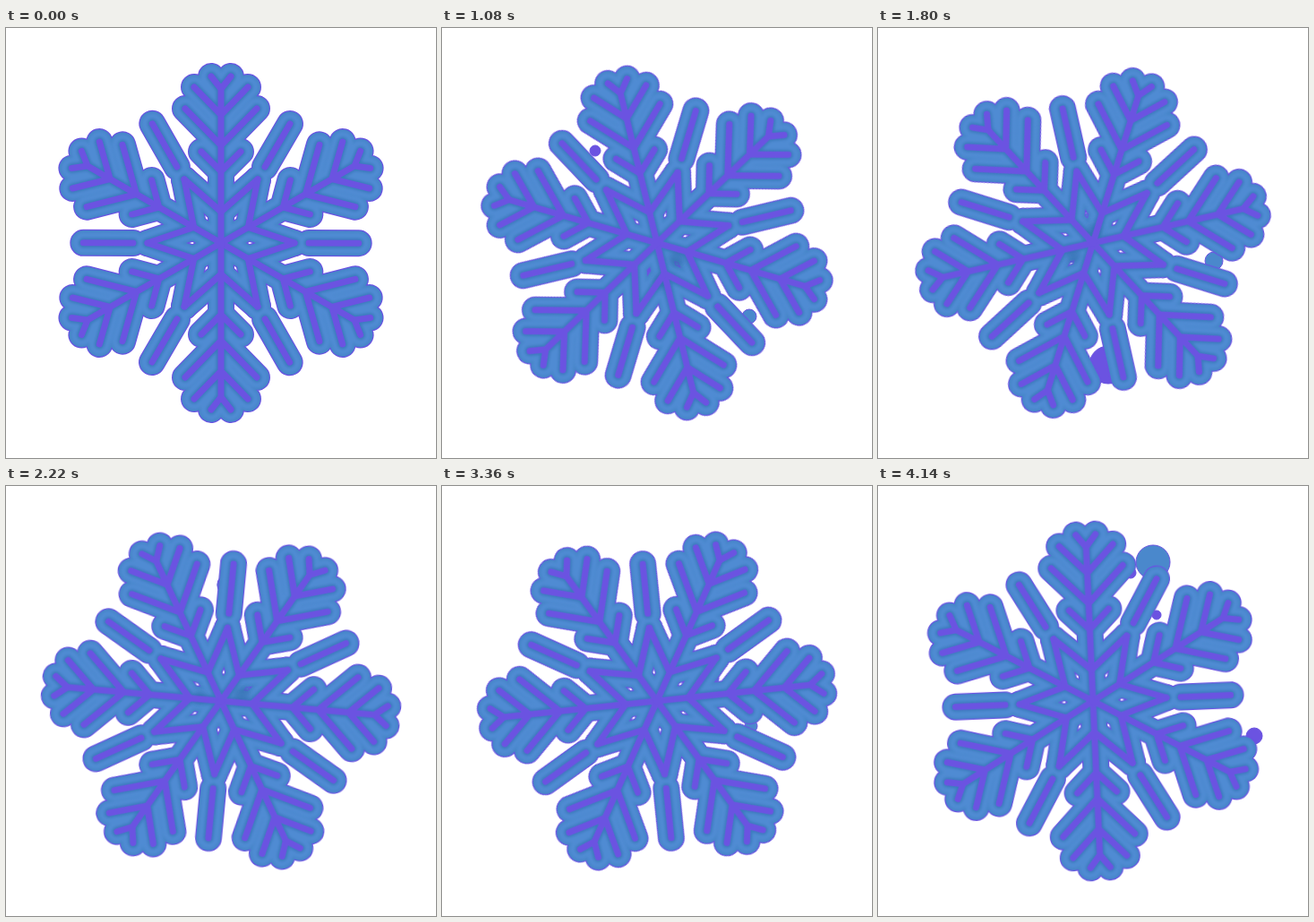
Animation of 480 by 480 pixels, one loop 4.2 s. Source, as an HTML page:

```html
<!DOCTYPE html>
<html lang="en">
<head>
<meta charset="utf-8">
<title>Snowflake</title>
<style>
  html, body { margin: 0; width: 100%; height: 100%; overflow: hidden; background: #fff; }
  svg { display: block; width: 100vw; height: 100vh; }
  .spin { animation: spin 4200ms steps(70) infinite; transform-origin: 0 0; }
  @keyframes spin { to { transform: rotate(180deg); } }
  .line { fill: none; stroke-linecap: round; stroke-linejoin: round; }
</style>
</head>
<body>
<svg viewBox="-240 -240 480 480">
  <defs>
    <g id="arm">
      <path d="M0 0V-172M-11 -186L0 -172L11 -186
               M-30 -174L0 -143L30 -174
               M-40 -150L0 -109L40 -150
               M-22 -102L0 -80L22 -102"/>
      <path d="M-41 -71L0 -35L41 -71"/>
      <path d="M49 -85L77 -133"/>
    </g>
    <g id="flake"></g>
    <filter id="soft" x="-10%" y="-10%" width="120%" height="120%">
      <feGaussianBlur stdDeviation="1.5"/>
    </filter>
    <filter id="blur" x="-50%" y="-50%" width="200%" height="200%">
      <feGaussianBlur stdDeviation="3"/>
    </filter>
  </defs>
  <g id="balls"></g>
  <g class="spin line">
    <use href="#flake" stroke="#6a50e2" stroke-width="30"/>
    <use href="#flake" stroke="#4585c8" stroke-width="27.6"/>
    <g filter="url(#soft)">
      <use href="#flake" stroke="#508bd3" stroke-width="23"/>
      <use href="#flake" stroke="#3a7abd" stroke-width="11"/>
    </g>
  </g>
  <g id="spots" fill="#2f6cab" filter="url(#blur)"></g>
  <g class="spin line">
    <use href="#flake" stroke="#6b53e1" stroke-width="7"/>
  </g>
</svg>
<script>
  const LOOP = 4200, STEP = 60;
  const PURPLE = '#6b53e1', BLUE = '#4a88cc';
  const byId = id => document.getElementById(id);

  function add(parent, tag, attrs) {
    const el = document.createElementNS('http://www.w3.org/2000/svg', tag);
    for (const k in attrs) el.setAttribute(k, attrs[k]);
    return parent.appendChild(el);
  }

  for (let i = 0; i < 6; i++) {
    add(byId('flake'), 'use', { href: '#arm', transform: `rotate(${i * 60})` });
  }

  // time, x, y, radius, speed and shrink per ms, colour
  const balls = [
    [660, -32, -115, 11, .2, .03, BLUE],
    [660, 28, 0, 9, .15, .02, BLUE],
    [1080, -69, -103, 6, .2, .02, PURPLE],
    [1080, 103, 82, 8, .15, .03, BLUE],
    [1080, 22, 18, 9, .15, .02, BLUE],
    [1800, 17, 136, 21, .13, .05, PURPLE],
    [1800, 135, 20, 10, .2, .03, BLUE],
    [1800, -22, 14, 8, .15, .02, BLUE],
    [2400, 10, -180, 6, .28, .03, BLUE],
    [2640, -210, -36, 5, .45, .005, BLUE],
    [2640, 103, -33, 8, .2, .03, BLUE],
    [2640, -35, 3, 9, .15, .02, BLUE],
    [3360, 105, 28, 7, .15, .03, BLUE],
    [3360, 62, -25, 7, .15, .02, BLUE],
    [3960, 180, -25, 6, .45, .006, BLUE],
    [4140, 67, -155, 19, .3, .02, BLUE],
    [4140, 42, -143, 6, .3, .02, PURPLE],
    [4140, 71, -96, 5, .3, .01, PURPLE],
    [4140, 180, 39, 9, .4, .02, PURPLE]
  ].map(([at, x, y, size, speed, shrink, fill]) => ({
    at, size, speed, shrink,
    far: Math.hypot(x, y),
    angle: Math.atan2(y, x),
    ball: add(byId('balls'), 'circle', { fill, stroke: PURPLE }),
    spot: add(byId('spots'), 'circle', { opacity: .55 })
  }));

  function draw() {
    const t = Math.floor(performance.now() % LOOP / STEP) * STEP;
    for (const b of balls) {
      const age = t - b.at;
      const dist = b.far + b.speed * age;
      const r = Math.min(22, b.size - b.shrink * age);
      const alive = dist > 0 && r > 0;
      for (const el of [b.ball, b.spot]) {
        el.setAttribute('cx', dist * Math.cos(b.angle));
        el.setAttribute('cy', dist * Math.sin(b.angle));
      }
      b.ball.setAttribute('r', Math.max(0, r));
      b.spot.setAttribute('r', Math.max(0, Math.min(r, 9)));
      b.ball.style.display = alive ? '' : 'none';
      b.spot.style.display = alive && dist < 55 ? '' : 'none';
    }
    requestAnimationFrame(draw);
  }
  draw();
</script>
</body>
</html>
```
